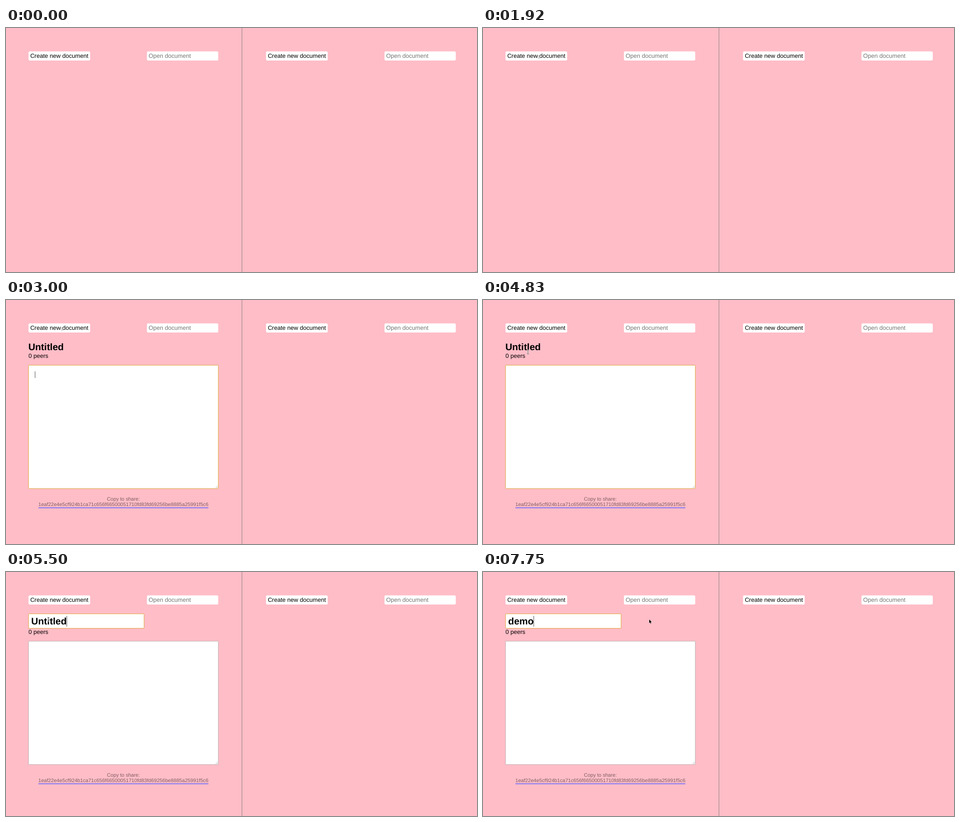
An HTML page for the animation above (8000 ms loop, 1037 px wide and 540 px high).

```html
<!DOCTYPE html>
<html lang="en">
<head>
<meta charset="utf-8">
<title>Shared document editor</title>
<style>
html, body { margin: 0; width: 100%; height: 100%; overflow: hidden; background: #ffbdc7; }
svg { display: block; }
text { font: 13.09px "Liberation Sans", Arial, sans-serif; text-rendering: geometricPrecision; white-space: pre; }
.big { font-size: 20.95px; font-weight: bold; }
.small { font-size: 11.11px; text-anchor: middle; opacity: .5; }
.hint { fill: #757575; }
.focus { stroke: #e0a030; }
</style>
</head>
<body>
<svg width="1037" height="540" viewBox="0 0 1037 540">
  <defs>
    <g id="bar">
      <rect x="49.5" y="51.8" width="135.8" height="20.1" rx="3" fill="#fff"/>
      <text x="53.4" y="66">Create new document</text>
      <rect x="310.3" y="51.8" width="157" height="20.1" rx="3" fill="#fff"/>
      <text class="hint" x="314" y="66">Open document</text>
    </g>
    <path id="ibeam" d="M-2-4.6Q0-4.6 0-3.6 0-4.6 2-4.6M0-3.6V3.6M-2 4.6Q0 4.6 0 3.6 0 4.6 2 4.6" fill="none"/>
  </defs>
  <rect x="519" width="1" height="540" fill="#8c8282"/>
  <use href="#bar"/>
  <use href="#bar" x="523"/>
  <rect id="ring" class="focus" x="49.6" y="51.6" width="135.5" height="20.2" rx="1" fill="none"/>

  <g id="doc">
    <text id="heading" class="big" x="49.2" y="111.3">Untitled</text>
    <g id="field">
      <rect class="focus" x="49.7" y="92.6" width="254.3" height="32" rx="1" fill="#fff"/>
      <rect id="selection" x="55.6" y="97" width="78" height="24" fill="#1e90ff"/>
      <text id="title" class="big" x="55.6" y="115.6"></text>
    </g>
    <g id="body">
      <text x="49.5" y="128">0 peers</text>
      <rect id="area" x="49.6" y="144.3" width="417.8" height="273" rx="1" fill="#fff"/>
      <path d="M461.5 416l4.5-4.5M464 416l2-2" stroke="#999" stroke-width=".7"/>
      <text class="small" x="258.4" y="444">Copy to share:</text>
      <text class="small" x="258.4" y="456.3">1eaf22e4e5cf924b1ca71c656f66500051710fd83fd69256be8885a25991f5c6</text>
      <rect x="71.4" y="459" width="374.2" height="1.7" fill="#6868ff"/>
    </g>
    <rect id="caret" width="1" fill="#444"/>
  </g>

  <g id="cursor">
    <path id="arrow" d="M0 0V8L1.8 6.5 3 9.2 4.2 8.7 3.1 6H5.4Z" stroke="#fff" stroke-width=".5" paint-order="stroke"/>
    <path id="hand" d="M1 .5L2 .4 3.4 3.2 6 3 7.3 4.6 7 7.6H3.6L.6 4.6 1.4 4 2.3 4.6Z" fill="#eee" stroke="#666" stroke-width=".6"/>
    <g id="beam">
      <use href="#ibeam" stroke="#fff" stroke-width="1.8"/>
      <use href="#ibeam" stroke="#222" stroke-width=".8"/>
    </g>
  </g>
</svg>
<script>
const LOOP = 8000, TICKS_PER_MS = 0.012; // the screen refreshes 12 times a second
const BLINK = 6;
const CREATE = 36, BLUR = 64, EDIT = 65, DRAG = 74, SELECT = 75, TYPE = 78, DONE = 81, REVEAL = 86;
const $ = id => document.getElementById(id);
const show = (id, on) => $(id).style.display = on ? '' : 'none';
const between = (n, from, to) => n >= from && n < to;
const easeOut = k => Math.sin(k * Math.PI / 2);

// Pointer glides, each starting where the last one ended
const home = { x: 1034.7, y: 538.4 };
const glides = [
  { from: 4, to: 7, x: 713, y: 186 },
  { from: 9, to: 12, x: 268, y: 142 },
  { from: 14, to: 21, x: 118, y: 59 },
  { from: 41, to: 46, x: 198, y: 296 },
  { from: 53, to: 58, x: 99, y: 115 },
  { from: 58, to: 60, x: 95, y: 27 },
  { from: 60, to: 63, x: 93, y: 105 },
  { from: 70, to: 72, x: 131, y: 108 },
  { from: 73, to: SELECT, x: 60, y: 108 },
  { from: 85, to: 90, x: 366, y: 105 }
];

function pointerAt(tick) {
  let { x, y } = home;
  for (const g of glides.filter(g => g.from < tick)) {
    const k = easeOut(Math.min(1, (tick - g.from) / (g.to - g.from)));
    x += (g.x - x) * k;
    y += (g.y - y) * k;
  }
  return [x, y];
}

function drawPointer(tick) {
  const [x, y] = pointerAt(tick);
  const hand = between(tick, 23, 39);
  const overTitle = y > 95 && x < (tick < EDIT ? 128 : 304);
  const beam = tick > 41 && (y > 144 || overTitle);
  show('cursor', !between(tick, TYPE, REVEAL));
  show('hand', hand);
  show('beam', beam);
  show('arrow', !hand && !beam);
  $('cursor').setAttribute('transform', `translate(${x} ${y})`);
}

function drawCaret(tick, editing) {
  const start = [DONE, DRAG, EDIT, CREATE].find(t => t <= tick);
  const lit = Math.floor((tick - start) / BLINK) % 2 === 0 || between(tick, TYPE, DONE);
  show('caret', lit && tick !== BLUR && !between(tick, SELECT, TYPE));
  $('caret').setAttribute('x', editing ? 55.4 + $('title').getComputedTextLength() : 63.5);
  $('caret').setAttribute('y', editing ? 97 : 158);
  $('caret').setAttribute('height', editing ? 24 : 14.5);
}

function draw() {
  const tick = Math.floor(performance.now() % LOOP * TICKS_PER_MS + 0.06);
  const editing = tick >= EDIT;
  show('ring', between(tick, CREATE - 2, CREATE));
  show('doc', tick >= CREATE);
  show('heading', !editing);
  show('field', editing);
  show('selection', between(tick, SELECT, TYPE));
  $('title').textContent = tick < TYPE ? 'Untitled' : 'demo'.slice(0, tick < DONE ? tick - TYPE + 2 : 4).slice(0, tick < DONE ? 3 : 4);
  $('area').setAttribute('stroke', tick < BLUR ? '#d9a630' : '#b9adaf');
  $('body').setAttribute('transform', `translate(0 ${editing ? 8.8 : 0})`);
  if (tick >= CREATE) drawCaret(tick, editing);
  drawPointer(tick);
  requestAnimationFrame(draw);
}
draw();
</script>
</body>
</html>
```
